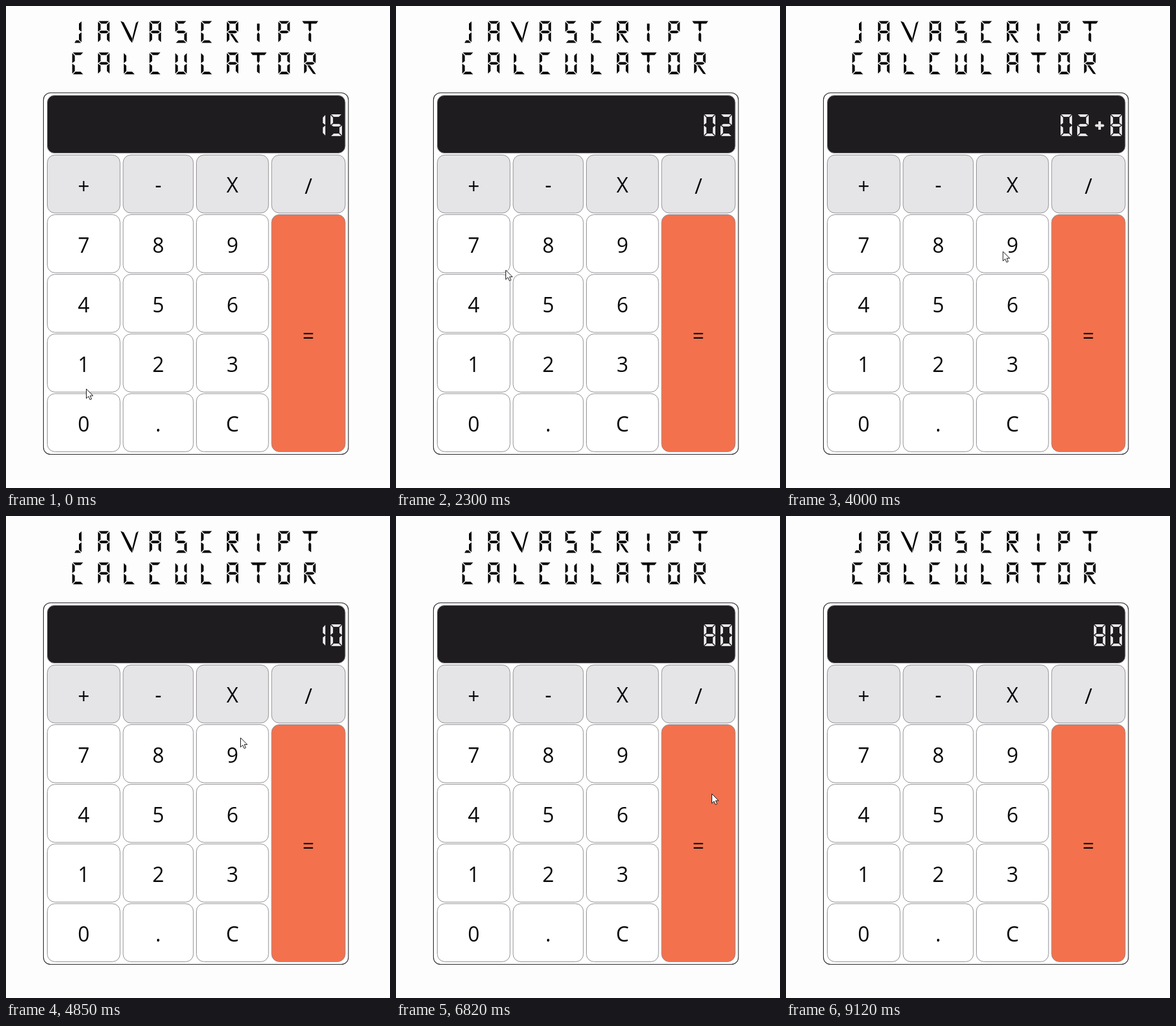
An HTML page for the animation above (9.18 s loop, 600 by 752 pixels).

```html
<!DOCTYPE html>
<html lang="en">
<head>
<meta charset="utf-8">
<title>JavaScript Calculator</title>
<style>
  html, body { margin: 0; width: 100%; height: 100%; overflow: hidden; background: #fefdfe; }
  svg { display: block; width: 600px; height: 752px; }
  .key { fill: #fff; stroke: #929094; }
  .op { fill: #e5e4e6; }
  .eq { fill: #f3714d; }
  .label { font: 32px "Open Sans", "Noto Sans", sans-serif; text-anchor: middle; fill: #080808; }
</style>
</head>
<body>
<svg viewBox="0 0 600 752">
  <g id="title" role="img" aria-label="JavaScript Calculator"></g>
  <rect x="58.5" y="135.5" width="476.5" height="564" rx="11" fill="#fff" stroke="#2a282b" stroke-width="1.1"/>
  <rect x="64.5" y="139.5" width="465.5" height="90" rx="11" fill="#1f1c1f" stroke="#8d8b8e"/>
  <g id="screen" fill="#e6e5e6"></g>
  <g id="keys"></g>
  <path id="cursor" d="M.5 .5V15.2L3.9 12L6.2 17.2L8.7 16.1L6.4 11.1H11Z" fill="#fff" stroke="#1c1a1c" stroke-linejoin="round"/>
</svg>
<script>
const LOOP = 9180;
const $ = id => document.getElementById(id);

function add(parent, tag, attrs, text) {
  const el = document.createElementNS("http://www.w3.org/2000/svg", tag);
  for (const k in attrs) el.setAttribute(k, attrs[k]);
  if (text) el.textContent = text;
  parent.append(el);
}

// Strokes of an 18 x 34 cell: a-g are the seven segments,
// u and l the centre stem, w a wide top bar, k a leg
const STROKES = {
  a: "M1 0H17L13 4H5Z",
  b: "M18 1V16.5L14 13.5V5Z",
  c: "M18 17.5V33L14 29V20.5Z",
  d: "M1 34L5 30H13L17 34Z",
  e: "M0 17.5L4 20.5V29L0 33Z",
  f: "M0 1L4 5V13.5L0 16.5Z",
  g: "M1.5 17L4.5 15H13.5L16.5 17L13.5 19H4.5Z",
  u: "M7 4H11V13.5L9 16.5L7 13.5Z",
  l: "M9 17.5L11 20.5V33L7 30V20.5Z",
  w: "M-3 0H22L19 4H0Z",
  k: "M5 20H9L18 33V34L14 33Z"
};
const GLYPHS = {
  0: "abcdef", 1: "bc", 2: "abdeg", 5: "acdfg", 8: "abcdefg",
  A: "abcefg", C: "adef", I: "ul", L: "def", O: "abcdef", P: "abefg",
  R: "abefgk", S: "acdfg", T: "wul", U: "bcdef"
};
const SLANTED = {
  J: "M14.5 .5V16.5L10.5 13.5V4ZM14.5 17.5V33L10.5 29V20.5ZM3.5 34L6 30H10L13.5 34Z",
  V: "M-5 0L0 2L13 27V34L9 29ZM23 0L19 3L13.5 26V34Z",
  X: "M-2 3H2L9 14.5L16 3H20L11.5 17.5L20 32H16L9 20.5L2 32H-2L6.5 17.5Z",
  "+": "M7 11H11V15.5H15L16.5 17.5L15 19.5H11V24H7V19.5H3L1.5 17.5L3 15.5H7Z"
};
const glyph = ch => SLANTED[ch] || [...GLYPHS[ch]].map(s => STROKES[s]).join("");

function write(parent, text, x, y, pitch) {
  [...text].forEach((ch, i) =>
    add(parent, "path", { d: glyph(ch), transform: `translate(${x + i * pitch} ${y})` }));
}
write($("title"), "JAVASCRIPT", 103.5, 23.5, 40.25);
write($("title"), "CALCULATOR", 103.5, 72.5, 40.25);

const COLS = [64.5, 183, 297.5, 415, 534.8], ROW = 93.1;

function key(label, col, row, cls = "", rows = 1) {
  const x = COLS[col], y = 232.4 + ROW * row;
  const width = COLS[col + 1] - 4.8 - x, height = ROW * rows - 2.5;
  const drop = "+/=".includes(label) ? 2 : 0;
  add($("keys"), "rect", { class: "key " + cls, x, y, width, height, rx: 12 });
  add($("keys"), "text", {
    class: "label", x: x + width / 2, y: Math.floor(y + height / 2 + 14.25) + drop
  }, label);
}
["+-X/", "789", "456", "123", "0.C"].forEach((line, row) =>
  [...line].forEach((ch, col) => key(ch, col, row, row ? "" : "op")));
key("=", 3, 1, "eq", 4);

// Pointer moves; a key is pressed shortly after the pointer arrives
const move = (leave, arrive, x, y, press) => ({ leave, arrive, x, y, press });
const MOVES = [
  move(-1, 0, 125, 597),
  move(30, 700, 345, 652, "C"),
  move(970, 1270, 160.5, 554.5),
  move(1420, 1640, 222, 565, "2"),
  move(1750, 2770, 131, 291, "+"),
  move(2850, 3450, 236, 369, "8"),
  move(3790, 4250, 470, 400, "="),
  move(4420, 5150, 306, 314, "X"),
  move(5560, 5960, 231, 370, "8"),
  move(6150, 6700, 493, 433, "="),
  move(7550, 8050, 604, 390)
];
const PRESS_DELAY = 80;

function solve(sum) {
  const [, a, op, b] = sum.match(/(\d+)(\D)(\d+)/);
  return String(op === "+" ? +a + +b : a * b);
}
function press(text, k) {
  return k === "C" ? "0" : k === "=" ? solve(text) : text + k;
}
const readout = t => MOVES
  .filter(m => m.press && m.arrive + PRESS_DELAY <= t)
  .reduce((text, m) => press(text, m.press), "15");

function pointer(t) {
  const i = Math.max(1, MOVES.filter(m => m.leave <= t).length - 1);
  const from = MOVES[i - 1], to = MOVES[i];
  const u = Math.min(1, Math.max(0, (t - to.leave) / (to.arrive - to.leave)));
  const s = u * u * (3 - 2 * u);
  return [from.x + (to.x - from.x) * s, from.y + (to.y - from.y) * s];
}

let shown;
function draw(t) {
  const text = readout(t);
  if (text !== shown) {
    shown = text;
    $("screen").replaceChildren();
    write($("screen"), text, 507 - 26 * (text.length - 1), 169, 26);
  }
  $("cursor").setAttribute("transform", `translate(${pointer(t)})`);
}
const start = performance.now();
function tick() {
  draw((performance.now() - start) % LOOP);
  requestAnimationFrame(tick);
}
tick();
</script>
</body>
</html>
```
